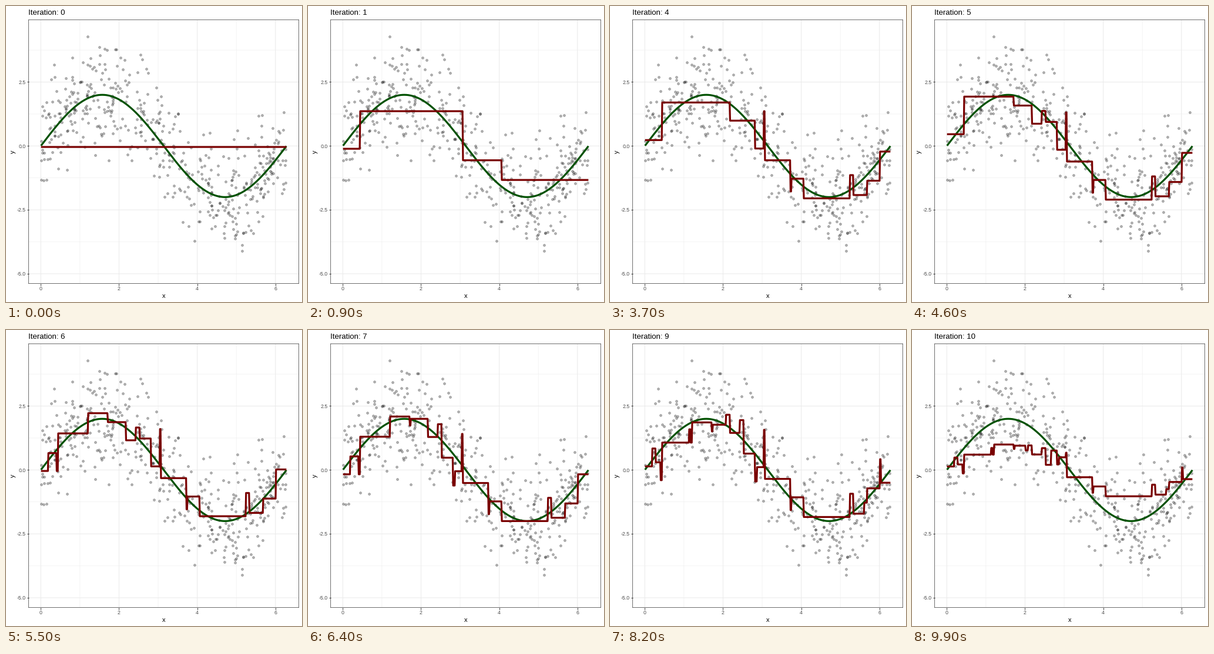
Animation of 504x504 px, one loop 10000 ms. Source, as a matplotlib script:

```python
import numpy as np
import matplotlib.pyplot as plt
from matplotlib.animation import FuncAnimation

SIZE = 504
LEFT, RIGHT, TOP, BOTTOM = 38.5, 498.5, 23.5, 472.5
X0, Y0 = 59.3, 238.3          # pixel position of the data origin
XS, YS = 66.58, 43.53         # pixels per data unit
FRAMES, PERIOD, POINTS = 100, 9, 500
RED, GREEN = "#790000", "#005100"
INK, LABEL, GRID = "#333333", "#4d4d4d", "#ebebeb"

plt.rcParams["font.family"] = "Liberation Sans"

# Each boosting round is a small tree: three split points, four leaf values.
TREES = [
    ((0.438, 3.07, 4.065), (-0.07, 1.40, -0.52, -1.29)),
    ((3.72, 5.237, 5.688), (0.29, -0.93, -0.02, 0.54)),
    ((3.75, 5.328, 6.008), (-0.14, 0.36, -0.42, 0.72)),
    ((2.173, 2.82, 3.045), (0.19, -0.52, -1.61, -0.15)),
    ((1.71, 2.43, 2.53), (0.23, -0.12, 0.38, -0.05)),
    ((0.19, 0.40, 1.21), (-0.50, 0.20, -0.50, 0.29)),
    ((1.738, 2.53, 2.865), (-0.13, 0.13, -0.75, -0.19)),
    ((2.068, 5.613, 6.03), (-0.23, 0.16, 0.59, -0.33)),
    ((0.281, 1.13, 1.167), (0.54, 0.0, 0.52, 0.0)),
    ((2.01, 2.67, 3.045), (0.17, -0.20, 0.92, -0.18)),
]


def truth(x):
    return 2 * np.sin(x)


def make_points():
    rng = np.random.default_rng(12)
    x = rng.uniform(0, 2 * np.pi, POINTS)
    noise = np.clip(rng.normal(0, 1, POINTS), -2.9, 2.5)
    return x, truth(x) + noise


def make_fits(x):
    """Running sum of the trees, starting from the overall mean."""
    fits = [np.full(x.size, -0.04)]
    for splits, leaves in TREES:
        fits.append(fits[-1] + np.take(leaves, np.searchsorted(splits, x)))
    return fits


def text(x, y, s, size, color="black", **kw):
    kw = {"ha": "center", "va": "baseline", **kw}
    return fig.text(x / SIZE, 1 - y / SIZE, s, size=size, color=color, **kw)


fig = plt.figure(figsize=(7, 7), dpi=72, facecolor="white")
ax = fig.add_axes([LEFT / SIZE, 1 - BOTTOM / SIZE,
                   (RIGHT - LEFT) / SIZE, (BOTTOM - TOP) / SIZE])
ax.set_xlim((LEFT - X0) / XS, (RIGHT - X0) / XS)
ax.set_ylim((Y0 - BOTTOM) / YS, (Y0 - TOP) / YS)
ax.set_axisbelow(True)

x_ticks, y_ticks = np.arange(0, 7, 2), np.arange(-5, 3, 2.5)
ax.set_xticks(x_ticks)
ax.set_yticks(y_ticks)
ax.set_xticks(x_ticks[:-1] + 1, minor=True)
ax.set_yticks(y_ticks + 1.25, minor=True)
ax.tick_params(length=2.75, width=1.07, color=INK,
               labelbottom=False, labelleft=False)
ax.tick_params(which="minor", length=0)
ax.grid(which="major", color=GRID, lw=1.07, snap=False)
ax.grid(which="minor", color=GRID, lw=0.53, snap=False)
for spine in ax.spines.values():
    spine.set(color=INK, linewidth=0.7, snap=False)

for t in x_ticks:
    text(X0 + t * XS, 484, f"{t}", 8.8, LABEL)
for t in y_ticks:
    text(33.5, Y0 - t * YS + 3.2, f"{t:.1f}", 8.8, LABEL, ha="right")
text(268.5, 497, "x", 11)
text(11.5, 248, "y", 11, va="center", rotation=90)
title = text(LEFT, 15, "", 13.2, ha="left")

shade = (0, 0, 0, 0.3)
ax.scatter(*make_points(), s=15.2, facecolors=[shade], edgecolors=[shade],
           linewidths=0.71, zorder=2, snap=False)

grid_x = np.linspace(0.005, 6.28, POINTS)
fits = make_fits(grid_x)
style = dict(lw=3.2, solid_capstyle="butt", solid_joinstyle="round", snap=False)
ax.plot(grid_x, truth(grid_x), color=GREEN, zorder=2.1, **style)
fit_line, = ax.plot([], [], color=RED, zorder=2.2, **style)


def pose(i):
    """Round on show, and whether it is halfway to the next one."""
    if i < PERIOD:
        return 0, i == PERIOD - 1
    return max(1, (i - 1) // PERIOD), i > PERIOD and i % PERIOD == 0


def update(i):
    k, halfway = pose(i)
    following = fits[(k + 1) % len(fits)]
    y = (fits[k] + following) / 2 if halfway else fits[k]
    fit_line.set_data(grid_x, y)
    title.set_text(f"Iteration: {k}")
    return fit_line, title


anim = FuncAnimation(fig, update, frames=FRAMES, interval=100,
                     repeat=True, repeat_delay=0, blit=False)
plt.show()
```
